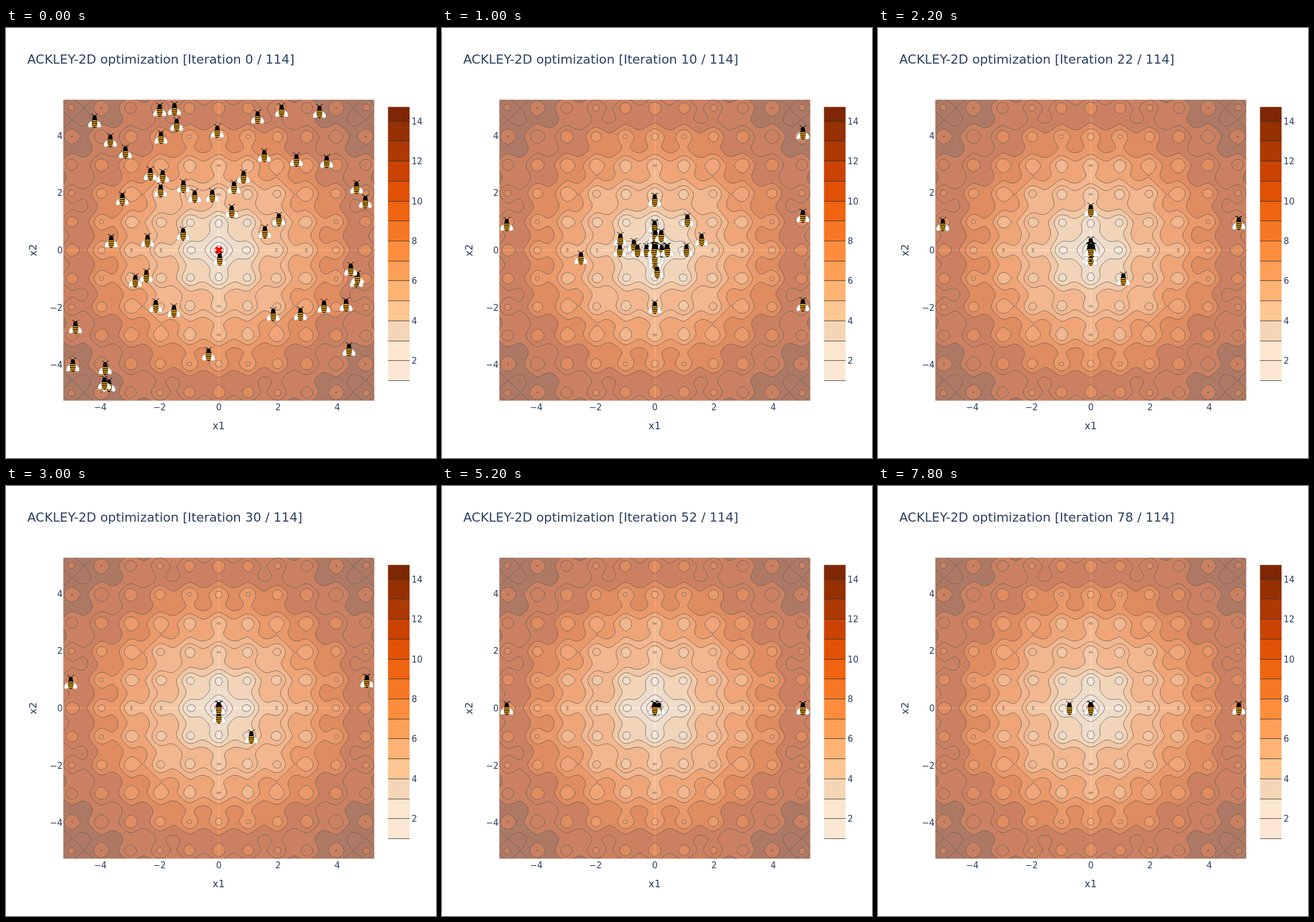
These frames come from a looping animation (748 by 748 pixels, 8000 ms). An HTML page with a canvas:

```html
<!DOCTYPE html>
<html lang="en">
<head>
<meta charset="utf-8">
<style>
  html, body { margin: 0; width: 100%; height: 100%; overflow: hidden; background: #fff; }
  canvas, svg { position: absolute; left: 0; top: 0; }
  text { font-family: "DejaVu Sans", sans-serif; font-size: 15px; fill: #2a3f5f; }
  .axis { font-size: 17.5px; text-anchor: middle; }
  #title { font-size: 21.95px; }
</style>
</head>
<body>
<canvas id="field" width="748" height="748"></canvas>
<svg width="748" height="748" viewBox="0 0 748 748">
  <defs>
    <g id="bee">
      <path d="M-1-9Q-2-12-6-12.500M1-9Q2-12 6-12.500" fill="none" stroke="#000" stroke-width=".9"/>
      <g fill="#fff" stroke="#888" stroke-width=".4">
        <ellipse rx="4.300" ry="6.800" transform="translate(-6 5) rotate(38)"/>
        <ellipse rx="4.300" ry="6.800" transform="translate(6 5) rotate(-38)"/>
      </g>
      <ellipse cy="-6.500" rx="3.600" ry="3.800"/>
      <ellipse cy="2" rx="5" ry="9.500"/>
      <path d="M-4.600-.5Q0-1.500 4.600-.5M-4.900 2.700Q0 1.700 4.900 2.700M-4.600 5.900Q0 4.900 4.600 5.900M-3.400 9Q0 8 3.400 9" fill="none" stroke="#fbb11c" stroke-width="1.800"/>
    </g>
  </defs>
  <text id="title" x="37" y="62"></text>
  <text class="axis" x="370" y="698">x1</text>
  <text class="axis" transform="translate(53 386.500) rotate(-90)">x2</text>
  <g id="scale"></g>
  <path d="M365.200 381.500l10 10m0-10l-10 10" stroke="#f00" stroke-width="5"/>
  <g id="swarm"></g>
</svg>
<script>
const LOOP = 8000, STEP = 200, RANGE = 5.25, CELLS = 105;
const plot = { left: 99.7, top: 124.7, width: 540.9, height: 523.6 };
const $ = id => document.getElementById(id);
const stageX = x => plot.left + (x + RANGE) / (2 * RANGE) * plot.width;
const stageY = y => plot.top + (RANGE - y) / (2 * RANGE) * plot.height;

function add(parent, tag, attrs, content = '') {
  const node = document.createElementNS(parent.namespaceURI, tag);
  for (const key in attrs) node.setAttribute(key, attrs[key]);
  node.textContent = content;
  return parent.appendChild(node);
}

function ackley(x, y) {
  const turn = 2 * Math.PI;
  return 20 - 20 * Math.exp(-0.2 * Math.sqrt((x * x + y * y) / 2))
    + Math.E - Math.exp((Math.cos(turn * x) + Math.cos(turn * y)) / 2);
}

// The surface is sampled on a mesh; column i, row j
const coord = i => -RANGE + i * 2 * RANGE / CELLS;
const mesh = Array.from({ length: CELLS + 2 }, (_, i) =>
  Array.from({ length: CELLS + 2 }, (_, j) => ackley(coord(i), coord(j))));

function meshHeight(u, v) {
  const i = Math.floor(u), j = Math.floor(v), a = u - i, b = v - j;
  return (mesh[i][j] * (1 - a) + mesh[i + 1][j] * a) * (1 - b)
    + (mesh[i][j + 1] * (1 - a) + mesh[i + 1][j + 1] * a) * b;
}

const tints = ['f4ede6', 'f3eae1', 'f0e2d8', 'efddcb', 'f2d5b8', 'f2c8a6', 'f2b78e', 'f2b78e',
  'efa577', 'ea996a', 'df8c60', 'cb8161', 'cb8161', 'ae7964', 'ae7964'];

function drawBands(ctx) {
  const meshAt = (p, start, size) => Math.min(Math.max((p + .5 - start) / size, 0), 1) * CELLS;
  for (let x = Math.floor(plot.left); x < plot.left + plot.width; x++) {
    for (let y = Math.floor(plot.top); y < plot.top + plot.height; y++) {
      const height = meshHeight(meshAt(x, plot.left, plot.width), meshAt(y, plot.top, plot.height));
      ctx.fillStyle = '#' + tints[Math.floor(height)];
      ctx.fillRect(x, y, 1, 1);
    }
  }
}

// Cut one triangle of the mesh at each whole level
function cut(ctx, triangle) {
  const values = triangle.map(p => p.v), high = Math.max(...values);
  for (let level = Math.ceil(Math.min(...values)); level < high; level++) {
    const ends = [];
    triangle.forEach((a, k) => {
      const b = triangle[(k + 1) % 3];
      if (a.v < level === b.v < level) return;
      const f = (level - a.v) / (b.v - a.v);
      ends.push([a.x + f * (b.x - a.x), a.y + f * (b.y - a.y)]);
    });
    if (ends.length === 2) {
      ctx.moveTo(...ends[0]);
      ctx.lineTo(...ends[1]);
    }
  }
}

function drawContours(ctx) {
  const corner = (i, j) => ({ x: stageX(coord(i)), y: stageY(coord(j)), v: mesh[i][j] });
  ctx.beginPath();
  for (let i = 0; i < CELLS; i++) {
    for (let j = 0; j < CELLS; j++) {
      const a = corner(i, j), b = corner(i + 1, j), c = corner(i, j + 1), d = corner(i + 1, j + 1);
      // Diagonals mirror about both axes
      const falling = (i < CELLS / 2) === (j < CELLS / 2);
      cut(ctx, falling ? [a, b, c] : [a, b, d]);
      cut(ctx, falling ? [b, c, d] : [a, c, d]);
    }
  }
  ctx.strokeStyle = '#5c5c5c';
  ctx.lineWidth = .8;
  ctx.stroke();
}

function drawField() {
  const ctx = $('field').getContext('2d');
  ctx.beginPath();
  ctx.rect(plot.left, plot.top, plot.width, plot.height);
  ctx.clip();
  drawBands(ctx);
  ctx.globalCompositeOperation = 'lighter';
  ctx.fillStyle = 'rgb(14,12,8)';
  ctx.fillRect(stageX(0) - 1.2, plot.top, 2.4, plot.height);
  ctx.fillRect(plot.left, stageY(0) - 1.2, plot.width, 2.4);
  ctx.globalCompositeOperation = 'source-over';
  drawContours(ctx);
}

function drawScales() {
  const scale = $('scale');
  const label = n => String(n).replace('-', '\u2212');
  for (let n = -4; n <= 4; n += 2) {
    add(scale, 'text', { x: stageX(n), y: 664.5, 'text-anchor': 'middle' }, label(n));
    add(scale, 'text', { x: 98.5, y: stageY(n) + 5.5, 'text-anchor': 'end' }, label(n));
  }
  const colours = ['fbe7d3', 'fbe6d0', 'f4d6b7', 'fdc692', 'fdb373', 'fda057', 'fd8d3c', 'f67825',
    'ee6410', 'e05106', 'ca4302', 'ad3903', '953003', '7f2704'];
  const levelY = n => Math.floor(613.4 - (n - 1) * 34.7) + .5;
  colours.forEach((colour, i) => {
    const bottom = levelY(i + 1), top = Math.max(137.3, levelY(i + 2));
    add(scale, 'rect', { x: 664.5, y: top, width: 37.5, height: bottom - top, fill: '#' + colour });
  });
  colours.forEach((_, i) => {
    const y = levelY(i + 1);
    add(scale, 'path', { d: `M664.5 ${y}h37.5`, stroke: '#222', 'stroke-width': .8 });
    if (i % 2) add(scale, 'text', { x: 705.5, y: y + 5.5 }, i + 1);
  });
}

let seed = 2024;
const random = () => (seed = seed * 16807 % 2147483647) / 2147483647;

// A searching bee pulls one coordinate at a time towards the optimum
function search() {
  const place = [random() * 10 - 5, random() * 10 - 5];
  const track = [[0, ...place]];
  for (let step = 1; step <= 12; step++) {
    const axis = random() < .5 ? 0 : 1;
    place[axis] *= random() ** 1.5;
    track.push([step * STEP, ...place]);
  }
  track.push([13 * STEP, 0, 0]);
  return track;
}

// Bees that stay out longer: [time, x1, x2]
const stragglers = [
  [[0, -4.93, -4], [400, -5, .9], [4200, -5, 0], [7600, -.72, 0]],
  [[0, 4.65, 2.2], [400, 5, 4.1], [1200, 5, 2], [2000, 5, .95], [3600, 5, 0]],
  [[0, 4.95, 1.7], [600, 5, 1.2], [1200, 5, .95], [4400, 5, 0]],
  [[0, 4.3, -1.9], [600, 5, -1.9], [2200, 0, -.3], [4400, 0, 0]],
  [[0, -.05, 4.15], [1000, 1.1, 1.05], [2000, 1.1, -1], [3400, 0, 0], [5000, .14, 0],
    [5600, 0, 0], [6600, .82, 0], [7200, 1.17, 0], [7400, 0, 0]],
];

const tracks = [...stragglers, ...Array.from({ length: 45 }, search)];
const bees = tracks.map(track => ({ track, node: add($('swarm'), 'use', { href: '#bee' }) }));

let shown = -1;
function frame() {
  const time = Math.floor(performance.now() % LOOP / STEP) * STEP;
  if (time !== shown) {
    shown = time;
    $('title').textContent = `ACKLEY-2D optimization [Iteration ${time / 100} / 114]`;
    for (const { track, node } of bees) {
      const [, x, y] = track.findLast(stop => stop[0] <= time);
      node.setAttribute('transform', `translate(${stageX(x)} ${stageY(y) + .5})`);
    }
  }
  requestAnimationFrame(frame);
}

drawField();
drawScales();
frame();
</script>
</body>
</html>
```
